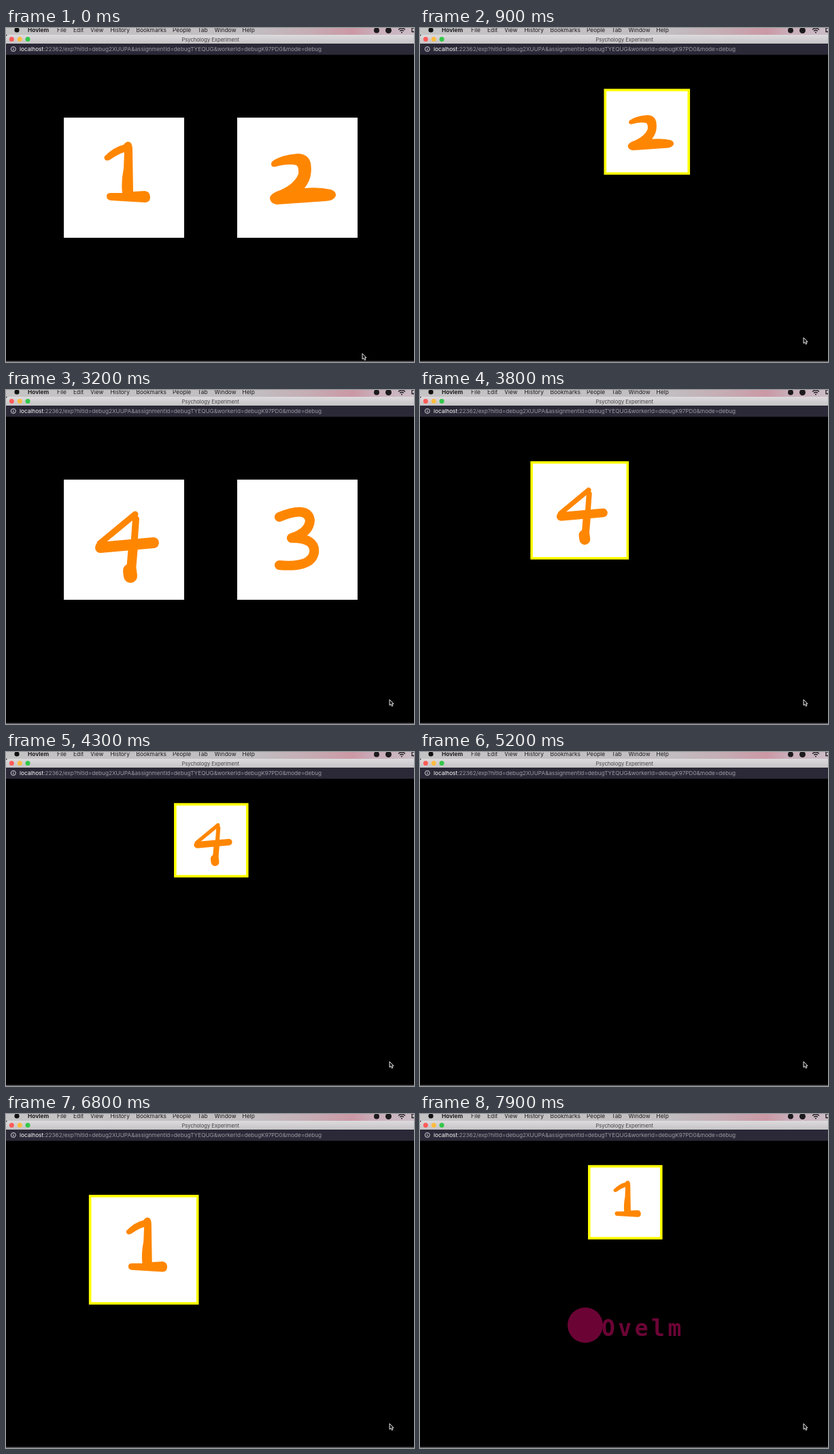
An HTML page for the animation above (8000 ms loop, 600 by 492 pixels).

```html
<!DOCTYPE html>
<html lang="en">
<head>
<meta charset="utf-8">
<title>Psychology Experiment</title>
<style>
  html, body { margin: 0; width: 100%; height: 100%; overflow: hidden; background: #000; }
  svg { display: block; width: 600px; height: 492px; }
  text { font-family: Inter, Roboto, sans-serif; }
  .menu { font-size: 8.4px; fill: #1c1a1c; }
  .title { font-size: 7.6px; fill: #454345; text-anchor: middle; }
  .url { font-size: 8.22px; fill: #9b99a3; }
  .url tspan { fill: #fff; }
  .brand { font: bold 33px "DejaVu Sans Mono", monospace; letter-spacing: 4.5px; }
  .digit { fill: none; stroke: #ff8600; stroke-linecap: round; stroke-linejoin: round; }
  .solid { fill: #ff8600; stroke: none; }
</style>
</head>
<body>
<svg viewBox="0 0 600 492">
  <defs>
    <linearGradient id="bar">
      <stop offset="0" stop-color="#c5c4c5"/>
      <stop offset=".62" stop-color="#c1bdc0"/>
      <stop offset=".74" stop-color="#c5adb4"/>
      <stop offset=".85" stop-color="#cb98a5"/>
      <stop offset=".9" stop-color="#c9acb8"/>
      <stop offset="1" stop-color="#cbbdc6"/>
    </linearGradient>
    <linearGradient id="frame" x2="0" y2="1">
      <stop offset="0" stop-color="#dddbdd"/>
      <stop offset="1" stop-color="#c5c3c5"/>
    </linearGradient>
    <g id="d1" class="digit">
      <path class="solid" d="M60 57Q74 43 88 40Q92 34 97 36Q101 38 101 48L102 109 119 108Q127 109 127 117Q127 125 119 125L69 122Q63 121 63 116Q63 111 69 111L86 111Q84 95 88 75L89 51Q79 54 68 62Q62 65 60 61Q59 59 60 57Z"/>
    </g>
    <g id="d2" class="digit">
      <path class="solid" d="M51 65Q63 55 90 53Q105 54 108 67Q111 85 103 98L99 104Q120 102 138 106Q146 109 145 115Q143 122 130 123L58 128Q48 126 48 118Q50 111 63 107Q84 98 90 83Q91 73 87 70Q75 67 57 72Q51 74 50 69Q50 67 51 65Z"/>
    </g>
    <g id="d3" class="digit">
      <path stroke-width="14" d="M62 55Q104 38 107 60Q106 78 80 86Q116 86 113 108Q108 130 62 126"/>
    </g>
    <g id="d4" class="digit">
      <path stroke-width="9" d="M105 51L53 94"/>
      <path stroke-width="16" d="M54 100L132 93"/>
      <path stroke-width="10" d="M106 58L103 100"/>
      <path stroke-width="14" d="M102 98L99 134"/>
      <path stroke-width="20" d="M97 134L98 142"/>
    </g>
  </defs>

  <rect width="600" height="492"/>
  <rect width="600" height="10" fill="url(#bar)"/>
  <circle cx="16" cy="3" r="3.6" fill="#111"/>
  <g class="menu">
    <text x="32" y="6" font-weight="700">Hovlem</text>
    <text x="75" y="6">File</text>
    <text x="99" y="6">Edit</text>
    <text x="124" y="6">View</text>
    <text x="153.5" y="6">History</text>
    <text x="191.5" y="6">Bookmarks</text>
    <text x="245" y="6">People</text>
    <text x="282" y="6">Tab</text>
    <text x="306.5" y="6">Window</text>
    <text x="347.5" y="6">Help</text>
  </g>
  <g fill="#1c1a1c">
    <circle cx="545" cy="3.5" r="4"/>
    <circle cx="562.5" cy="3.5" r="4.5"/>
    <circle cx="582" cy="6.5" r="1"/>
  </g>
  <path d="M577 2.5Q582-2 587 2.500M579.2 4.5Q582 2 584.8 4.5M600 0H597V5.5H600" fill="none" stroke="#1c1a1c" stroke-width="1.3"/>

  <path d="M0 23V13Q0 10 3 10H600V23Z" fill="url(#frame)"/>
  <circle cx="8.3" cy="16.5" r="3.5" fill="#fc5b57"/>
  <circle cx="20.2" cy="16.5" r="3.5" fill="#fdbc40"/>
  <circle cx="32" cy="16.5" r="3.5" fill="#34c84a"/>
  <text class="title" x="300.7" y="19.5">Psychology Experiment</text>

  <rect y="23" width="600" height="16.5" fill="#2b2937"/>
  <circle cx="10.8" cy="31" r="3.5" fill="none" stroke="#e4e3e8" stroke-width=".9"/>
  <path d="M10.8 30.5V33M10.8 28.8V29.6" stroke="#e4e3e8"/>
  <text class="url" x="20" y="34"><tspan>localhost</tspan>:22362/exp?hitId=debug2XUUPA&amp;assignmentId=debugTYEQUG&amp;workerId=debugK97PD0&amp;mode=debug</text>
  <rect y="490.5" width="600" height="1.5" fill="#5c5a5e"/>

  <g id="left"><rect width="177" height="177" fill="#fff"/><use/></g>
  <g id="right"><rect width="177" height="177" fill="#fff"/><use/></g>
  <rect id="border" fill="none" stroke="#ff0" stroke-width="3.6"/>
  <g id="outcome" fill="#6b0435">
    <circle cx="243" cy="311" r="26"/>
    <text class="brand" x="267" y="327">Ovelm</text>
  </g>
  <path id="cursor" d="M0 0V8.5L2 6.8 3.4 9.8 5 9 3.7 6.2H6Z" fill="#111" stroke="#fff" stroke-width=".9"/>
</svg>

<script>
const LOOP = 8000, STEP = 100, MOVE = 400;
const SIZE = 177, PICKED_SIZE = 173.4, END_SIZE = 105.9;
const HOME = { left: 173.5, right: 428.5, y: 220.5 };
const GOAL = { x: 301.8, y: 130 };

const trials = [
  { show: 0, pick: 600, start: 601, hide: 2300, left: 1, right: 2, chosen: 'right' },
  { show: 2800, pick: 3600, start: 3609, hide: 5200, left: 4, right: 3, chosen: 'left' },
  { show: 5700, pick: 6700, start: 6709, hide: LOOP, left: 1, right: 2, chosen: 'left', outcome: 7300 }
];

const el = id => document.getElementById(id);
const clamp = v => Math.min(1, Math.max(0, v));
const mix = (a, b, f) => a + (b - a) * f;
const toggle = (id, on) => el(id).setAttribute('visibility', on ? 'visible' : 'hidden');

function placeCard(side, digit, size, f) {
  const x = mix(HOME[side], GOAL.x, f) - size / 2;
  const y = mix(HOME.y, GOAL.y, f) - size / 2;
  el(side).setAttribute('transform', `translate(${x} ${y}) scale(${size / SIZE})`);
  el(side).querySelector('use').setAttribute('href', '#d' + digit);
  return { x, y, width: size, height: size };
}

function draw(t) {
  const trial = trials.find(k => t >= k.show && t < k.hide);
  const picked = !!trial && t >= trial.pick;
  for (const side of ['left', 'right']) {
    const chosen = picked && trial.chosen === side;
    toggle(side, trial && (!picked || chosen));
    if (!trial) continue;
    const f = chosen ? clamp((t - trial.start) / MOVE) : 0;
    const size = chosen ? mix(PICKED_SIZE, END_SIZE, f) : SIZE;
    const box = placeCard(side, trial[side], size, f);
    if (chosen) for (const key in box) el('border').setAttribute(key, box[key]);
  }
  toggle('border', picked);
  toggle('outcome', trial && t >= trial.outcome);

  const glide = clamp(t / 500);
  const ease = glide * glide * (3 - 2 * glide);
  el('cursor').setAttribute('transform', `translate(${mix(524, 564, ease)} ${mix(479.5, 456, ease)})`);
}

const origin = performance.now();
function tick() {
  const t = (performance.now() - origin) % LOOP;
  draw(Math.floor(t / STEP) * STEP);
  requestAnimationFrame(tick);
}
tick();
</script>
</body>
</html>
```
